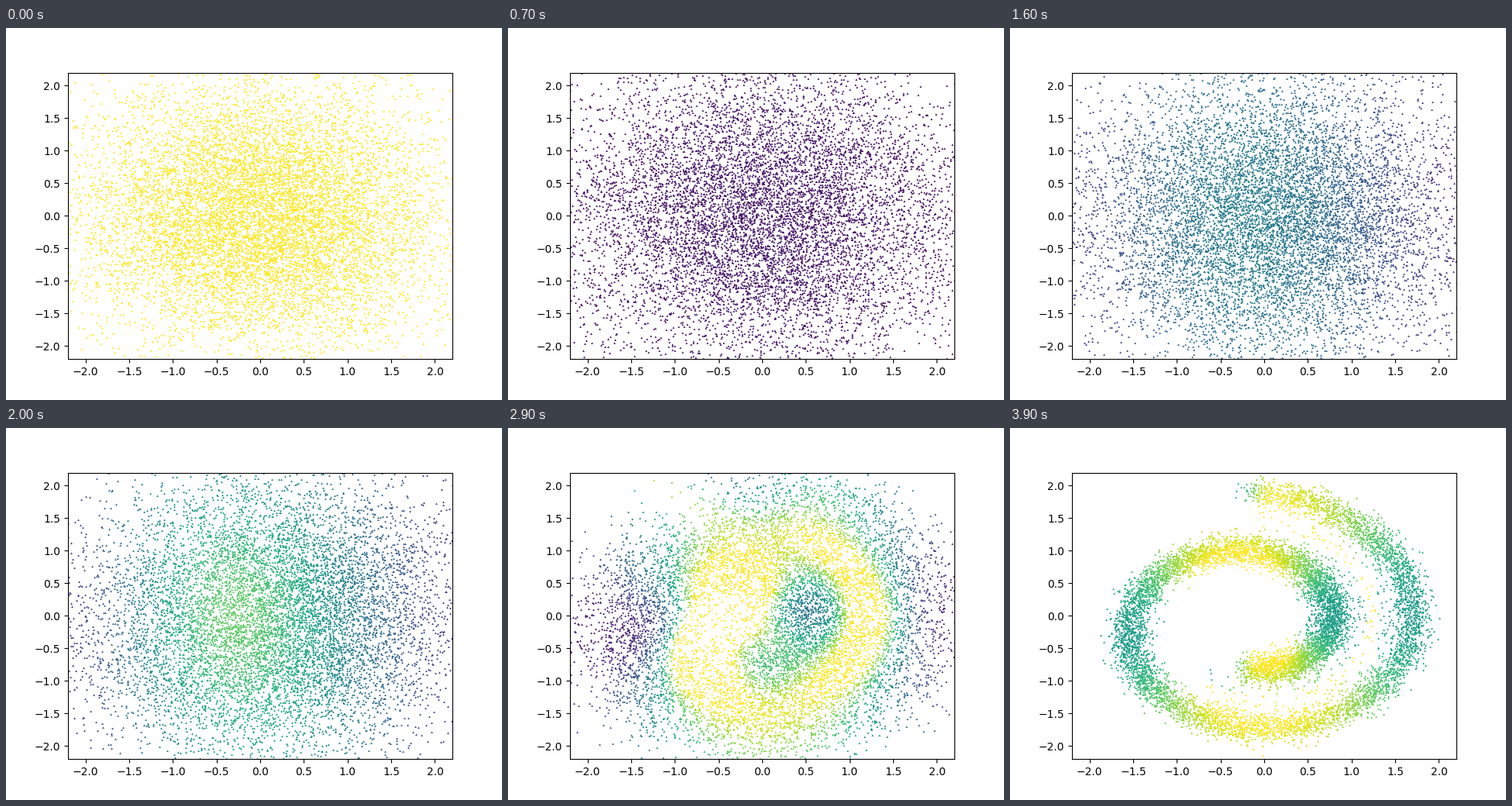
A matplotlib script that plays this animation: 640x480 px, repeating every 4000 ms.

```python
import numpy as np
import matplotlib.pyplot as plt
from matplotlib.animation import FuncAnimation

FRAMES = 40
COUNT = 10000
LIMIT = 2.2
TUBE = 0.082          # thickness of the clean spiral
DOT = 2.7             # marker width in pixels
DPI = 100

rng = np.random.default_rng(7)


def spiral(t, radius=None):
    """Swiss roll, scaled and shifted to unit size."""
    r = t if radius is None else radius
    return np.column_stack([0.147 * r * np.cos(t) - 0.15,
                            0.1445 * r * np.sin(t) - 0.13])


def signal_noise(k):
    """Signal and noise weights after k noising steps."""
    p = k / (FRAMES - 1)
    u = 0.14 + 0.86 * p - 0.02 * np.sin(2 * np.pi * p)
    angle = np.pi / 4 * (1 - np.cos(np.pi * u))
    return np.cos(angle), np.sin(angle)


def swell(i):
    """The cloud widens shortly after the start, then settles."""
    x = i / 7
    return 1 + 0.18 * (x * np.exp(1 - x))**2


def clean_points():
    t = 1.5 * np.pi * (1 + 2 * rng.random(COUNT))
    radius = t.copy()
    # a few strays lie between the turns of the roll
    stray = (t > 3.35 * np.pi) & (rng.random(COUNT) < 0.08)
    radius[stray] -= rng.uniform(1.0, 4.5, stray.sum())
    return spiral(t, radius) + TUBE * rng.normal(size=(COUNT, 2))


def noising_chain():
    """Positions from clean to pure noise, one array per step."""
    a, s = signal_noise(0)
    pts = a * clean_points() + s * rng.normal(size=(COUNT, 2))
    chain = [pts]
    for k in range(1, FRAMES):
        a_next, _ = signal_noise(k)
        keep = a_next / a
        pts = keep * pts + np.sqrt(1 - keep**2) * rng.normal(size=pts.shape)
        chain.append(pts)
        a = a_next
    return chain


ridge = spiral(np.linspace(1.4 * np.pi, 4.5 * np.pi, 160))


def sensitivity(pts, k):
    """Horizontal derivative of the best guess for the clean position."""
    if k == FRAMES - 1:
        return np.ones(len(pts))
    a, s = signal_noise(k)
    var = s**2 + (a * TUBE)**2
    dist2 = ((pts**2).sum(1)[:, None] - 2 * a * pts @ ridge.T
             + a**2 * (ridge**2).sum(1))
    nearest = dist2.min(axis=1)
    w = np.exp(-(dist2 - nearest[:, None]) / (2 * var))
    w /= w.sum(axis=1, keepdims=True)
    rx = ridge[:, 0]
    spread = w @ rx**2 - (w @ rx)**2
    slope = a / var * (TUBE**2 + s**2 / var * spread)
    slope *= np.exp(-0.2 * s**2 * pts[:, 0]**2)
    # strays far from the ridge are fully uncertain
    return slope + np.clip((nearest / var - 12) / 6, 0, 1)


chain = noising_chain()
shades = [sensitivity(p, k) for k, p in enumerate(chain)]

fig, ax = plt.subplots(figsize=(6.4, 4.8), dpi=DPI)
ax.set_xlim(-LIMIT, LIMIT)
ax.set_ylim(-LIMIT, LIMIT)


def snap(pts):
    """Align the dots with the pixel grid."""
    px = ax.transData.transform(pts)
    px[:, 0] = np.floor(px[:, 0]) + 0.5
    px[:, 1] = np.round(px[:, 1] - DOT / 2) + DOT / 2
    return ax.transData.inverted().transform(px)


dots = ax.scatter(chain[-1][:, 0], chain[-1][:, 1], c=shades[-1],
                  s=(DOT * 72 / DPI)**2, marker='^', linewidths=0,
                  cmap='viridis', vmin=0, vmax=1)


def update(i):
    k = FRAMES - 1 - i
    dots.set_offsets(snap(chain[k] * swell(i)))
    dots.set_array(shades[k])
    return dots,


anim = FuncAnimation(fig, update, frames=FRAMES, interval=100,
                     repeat=True, repeat_delay=0)
plt.show()
```
